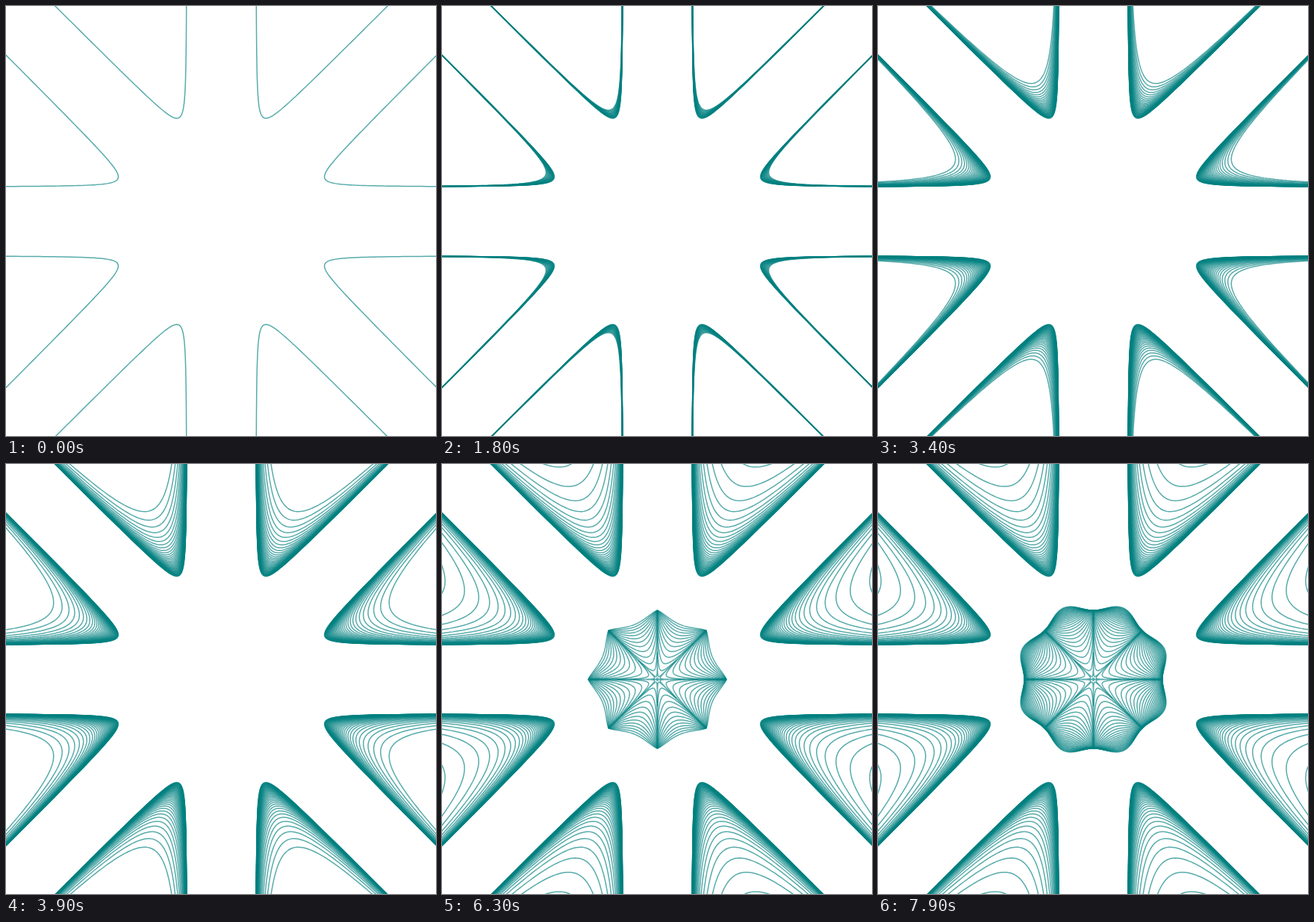
An HTML page that plays this animation: 576x576 px, repeating every 8 s.

```html
<!DOCTYPE html>
<html lang="en">
<head>
<meta charset="utf-8">
<title>Superformula family</title>
<style>
  html, body { margin: 0; width: 100%; height: 100%; overflow: hidden; background: #fff; }
  svg { display: block; width: 100vw; height: 100vh; }
  path { fill: none; stroke: #008080; stroke-opacity: .66; stroke-width: 1.5; stroke-linejoin: bevel; }
</style>
</head>
<body>
<svg id="stage" viewBox="0 0 576 576"></svg>
<script>
const CENTER = 288.5, UNIT = 92.3;
const STEP = 100, COUNT = 80, SAMPLES = 64;
const SECTOR = Math.PI / 4;

// r = (|cos 2θ|^p + |sin 2θ|^p)^(-1/p), with p running from -5 to 3 and skipping 0
const exponent = n => (n < 50 ? n - 50 : n - 49) / 10;
const radius = (a, p) => (Math.cos(2 * a) ** p + Math.sin(2 * a) ** p) ** (-1 / p);

// Smallest angle sampled next to an axis: open curves stop beyond the stage edge
function margin(axis, p) {
  if (p < 0) return 0.08;
  return axis % 4 ? 2e-4 : 1e-5;
}

function point(angle, r) {
  const x = CENTER + UNIT * r * Math.cos(angle);
  const y = CENTER - UNIT * r * Math.sin(angle);
  return x.toFixed(2) + ' ' + y.toFixed(2);
}

function sectorPoints(k, p) {
  const points = [];
  const add = (axis, side, i) => {
    const m = margin(axis, p);
    const a = m + (SECTOR / 2 - m) * (i / SAMPLES) ** 2;
    points.push(point(axis * SECTOR + side * a, radius(a, p)));
  };
  for (let i = 0; i <= SAMPLES; i++) add(k, 1, i);
  for (let i = SAMPLES - 1; i >= 0; i--) add(k + 1, -1, i);
  return points.join('L');
}

function curve(p) {
  const sectors = Array.from({ length: 8 }, (_, k) => sectorPoints(k, p));
  return p < 0 ? 'M' + sectors.join('M') : 'M' + sectors.join('L') + 'Z';
}

const stage = document.getElementById('stage');
const curves = Array.from({ length: COUNT }, (_, n) => {
  const path = document.createElementNS('http://www.w3.org/2000/svg', 'path');
  // Between these steps the open curves lie wholly outside the stage
  if (n < 43 || n >= 50) path.setAttribute('d', curve(exponent(n)));
  return stage.appendChild(path);
});

let shown = -1;
function render(time) {
  const last = Math.floor(time % (STEP * COUNT) / STEP);
  if (last === shown) return;
  curves.forEach((path, n) => { path.style.display = n <= last ? '' : 'none'; });
  shown = last;
}

function tick() {
  render(performance.now());
  requestAnimationFrame(tick);
}
tick();
</script>
</body>
</html>
```
